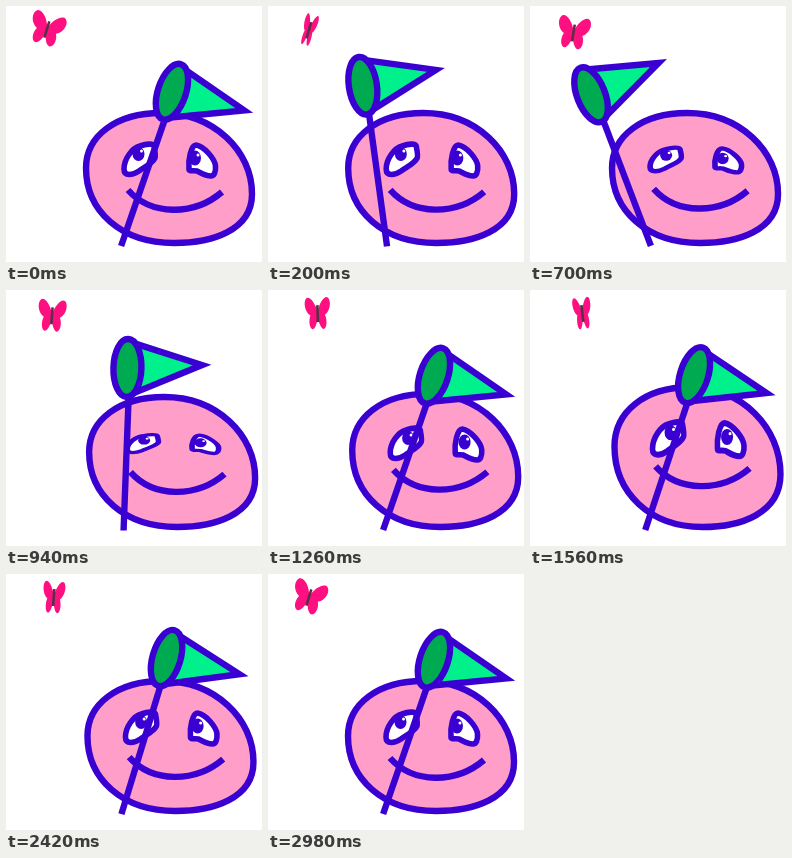
These frames come from a looping animation (256 px wide and 256 px high, 3 s). An HTML page:

```html
<!DOCTYPE html>
<html lang="en">
<head>
<meta charset="utf-8">
<title>Butterfly net</title>
<style>
  html, body { margin: 0; width: 100%; height: 100%; overflow: hidden; background: #fff; }
  svg { display: block; width: 100vw; height: 100vh; }
  .ink { stroke: #3a00d2; stroke-width: 6.4; stroke-linejoin: round; }
  .ink * { vector-effect: non-scaling-stroke; }
  .eye { stroke-width: 5.6; }
  .pupil { fill: #3a00d2; stroke: none; }
  .glint { fill: #fff; stroke: none; }
</style>
</head>
<body>
<svg viewBox="0 0 256 256">
  <defs>
    <path id="wing" d="M0 -1C3 -11 11 -18 15 -15C19 -12 18 -2 10 2C13 7 12 16 7 16C3 15 1 8 0 5Z"/>
    <path id="lidL" d="M118 163C118 153 126 142 134 140C140 138 147 137 148 140C149 145 150 150 149 152C146 158 138 161 133 165C127 169 118 171 118 163Z"/>
    <path id="lidR" d="M183 163C182 154 185 139 190 139C198 140 209 153 209.500 160C210 166 208 170 205 170C199 170 195 167 191 165C187 164 183 166 183 163Z"/>
    <clipPath id="clipL"><use href="#lidL"/></clipPath>
    <clipPath id="clipR"><use href="#lidR"/></clipPath>
  </defs>

  <g id="butterfly" fill="#ff1080">
    <use id="wingL" href="#wing"/>
    <use id="wingR" href="#wing"/>
    <path d="M0 -8V9" stroke="#5a3048" stroke-width="2.6"/>
  </g>

  <g class="ink" fill="none">
    <path id="body" fill="#ff9fc9" d="M80 162C80 130 110 107 155 107C208 107 246 145 246 188C246 225 205 237 168 237C115 237 80 205 80 162Z"/>
    <path id="mouth" d="M122 184C145 210 188 210 216 186"/>
    <g id="eyes" class="eye">
      <use href="#lidL" fill="#fff"/>
      <use href="#lidR" fill="#fff"/>
      <g clip-path="url(#clipL)"><g class="gaze">
        <ellipse class="pupil" cx="132.500" cy="148" rx="6" ry="7"/>
        <circle class="glint" cx="135.500" cy="145" r="1.500"/>
      </g></g>
      <g clip-path="url(#clipR)"><g class="gaze">
        <ellipse class="pupil" cx="189" cy="152" rx="6" ry="7.500"/>
        <circle class="glint" cx="192" cy="149" r="1.500"/>
      </g></g>
    </g>
  </g>

  <g id="net" class="ink">
    <path d="M0 8.500L1.500 -126"/>
    <path fill="#00f08c" stroke-linejoin="miter" d="M2 -180L74 -159L4 -128"/>
    <ellipse fill="#00aa50" cx="-0.500" cy="-154" rx="14" ry="29"/>
  </g>
</svg>

<script>
const LOOP = 3000;
const $ = id => document.getElementById(id);
const gazes = document.querySelectorAll('.gaze');
const place = (id, value) => $(id).setAttribute('transform', value);

const clamp = p => Math.min(1, Math.max(0, p));
const ease = p => (1 - Math.cos(Math.PI * clamp(p))) / 2;

// Rises from 0 to 1 at the peak, then falls back to 0.
const bump = (t, from, peak, to) =>
  t < peak ? ease((t - from) / (peak - from)) : ease((to - t) / (to - peak));

function draw(t) {
  const turn = 2 * Math.PI * t / LOOP;
  const sway = 2.25 * (1 - Math.cos(turn));
  const lift = 11.5 * bump(t, 1000, 1750, 2400);
  const squint = bump(t, 500, 890, 1240);
  const stare = bump(t, 1240, 1800, 2400);
  const open = 1 - 0.43 * squint + 0.12 * stare;

  place('body', `translate(${sway} 237) scale(1 ${1 + lift / 130}) translate(0 -237)`);
  place('mouth', `translate(${sway * 0.8} ${-sway * 0.6 - lift * 0.5})`);
  place('eyes', `translate(${sway} ${154 - 8 * stare}) scale(1 ${open}) translate(0 -154)`);
  gazes.forEach(g => g.setAttribute('transform', `translate(${sway * 0.8} 0)`));

  const swing = 18.4 - 54.2 * bump(t, 0, 405, 1265) - 2.8 * bump(t, 1265, 2135, LOOP);
  place('net', `translate(117.8 232) rotate(${swing})`);

  const x = 41 + 12.5 * bump(t, 200, 1900, LOOP);
  const y = 23 + 3.5 * bump(t, 0, 670, 1340);
  const tilt = 17 - 25 * bump(t, 0, 1860, LOOP);
  const flap = 0.66 + 0.34 * Math.cos(9 * turn);
  place('butterfly', `translate(${x} ${y}) rotate(${tilt})`);
  place('wingL', `scale(${-flap} 1)`);
  place('wingR', `scale(${flap} 1)`);
}

const start = performance.now();
function tick() {
  draw((performance.now() - start) % LOOP);
  requestAnimationFrame(tick);
}
draw(0);
requestAnimationFrame(tick);
</script>
</body>
</html>
```
